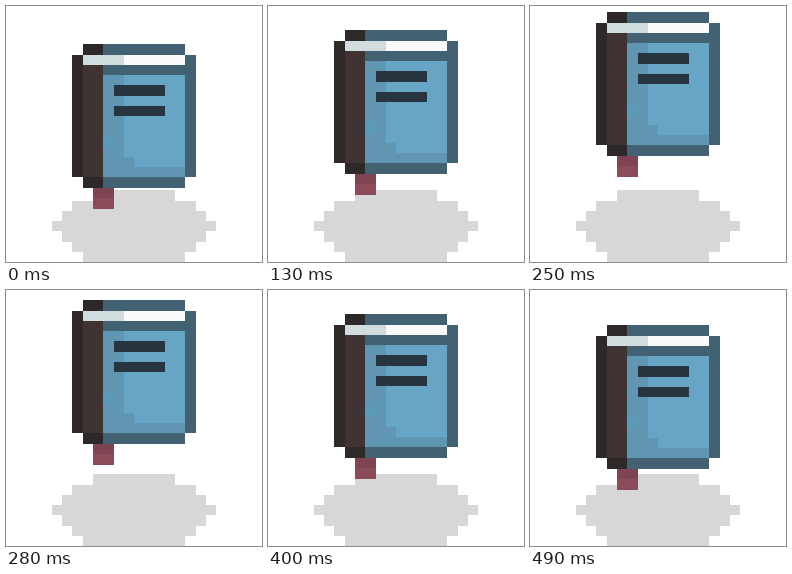
Recreate the animation shown at these times as an HTML page with a canvas. Size 256x256 px, loop 560 ms.

```html
<!DOCTYPE html>
<html lang="en">
<head>
<meta charset="utf-8">
<title>Floating book</title>
<style>
  html, body { margin: 0; width: 100%; height: 100%; overflow: hidden; background: #fff; }
  canvas { display: block; width: 256px; height: 256px; }
</style>
</head>
<body>
<canvas id="stage" width="256" height="256"></canvas>
<script>
const ctx = document.getElementById('stage').getContext('2d');
const CELL = 10.24, LOOP = 560, HOLD = 70, STEP = 30;

const DARK = '#2e2829', SPINE = '#3f3333', EDGE = '#426172', COVER = '#66a5c5',
      SHADE = '#6196b2', PAGE = '#f9fafa', PAGE_SHADE = '#d0dcdd', INK = '#273540',
      TEAL = '#5a9cb8', RIBBON = '#8c4b59', RIBBON_DARK = '#7f4452', SHADOW = '#d7d7d7';

// Column, row, width, height in cells; later parts cover earlier ones.
const book = [
  [2, 14, 2, 1, RIBBON_DARK], [2, 15, 2, 1, RIBBON],
  [0, 1, 1, 12, DARK], [1, 0, 2, 14, DARK],
  [3, 0, 8, 14, EDGE], [11, 1, 1, 12, EDGE],
  [1, 1, 4, 1, PAGE_SHADE], [5, 1, 6, 1, PAGE],
  [1, 2, 2, 11, SPINE],
  [3, 3, 8, 10, SHADE], [5, 3, 6, 8, COVER], [6, 11, 5, 1, COVER],
  [3, 9, 1, 1, TEAL],
  [4, 4, 5, 1, INK], [4, 6, 5, 1, INK]
];
const shadowWidths = [8, 12, 14, 16, 14, 12, 10];

const colX = c => c === 0 ? 66 : c === 12 ? 190 : Math.round(66.6 + c * CELL);
const rowY = r => r === 16 ? 165 : Math.round(0.3 + r * CELL);

function fill(x0, y0, x1, y1, color) {
  ctx.fillStyle = color;
  ctx.fillRect(x0, y0, x1 - x0, y1 - y0);
}

function drawShadow() {
  shadowWidths.forEach((w, i) => {
    const half = w / 2;
    fill(colX(6 - half), Math.round((18 + i) * CELL),
         colX(6 + half), Math.round((19 + i) * CELL), SHADOW);
  });
}

// Fast linear rise, slower linear fall, in held steps.
function lift(t) {
  const k = t < HOLD ? 0 : Math.min(15, 1 + Math.floor((t - HOLD) / STEP));
  return Math.round(k <= 7 ? Math.min(32, k * 4.6) : 32 - (k - 7) * 3.63);
}

function draw() {
  const top = 38 - lift(performance.now() % LOOP);
  fill(0, 0, 256, 256, '#fff');
  drawShadow();
  for (const [c, r, w, h, color] of book)
    fill(colX(c), top + rowY(r), colX(c + w), top + rowY(r + h), color);
  requestAnimationFrame(draw);
}
draw();
</script>
</body>
</html>
```
